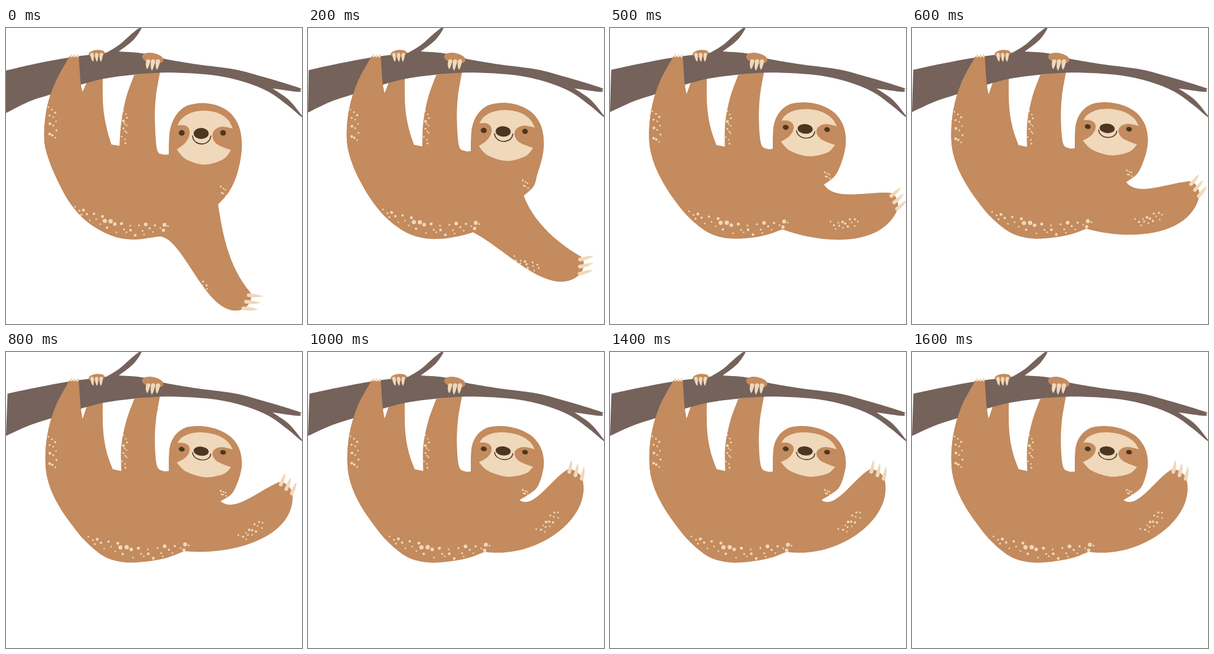
Recreate the animation shown at these times as an HTML page with a canvas. Size 480 by 480 pixels, loop 1.8 s.

```html
<!DOCTYPE html>
<html>
<head>
<meta charset="utf-8">
<style>
html, body { margin: 0; width: 100%; height: 100%; overflow: hidden; background: #fff; }
canvas { display: block; }
</style>
</head>
<body>
<canvas id="stage" width="480" height="480"></canvas>
<script>
const ctx = document.getElementById('stage').getContext('2d');
const FUR = '#c38b5e', BARK = '#74625b', CREAM = '#f0d8ba', DARK = '#4b3621';

// Key poses: time, torso swing, armpit, palm, slope of the knuckles in degrees
const poses = [
  { at: 0, swing: 0, armpit: [344, 286], palm: [390, 442], turn: 112 },
  { at: 200, swing: .45, armpit: [350, 272], palm: [441, 385], turn: 92 },
  { at: 300, swing: .5, armpit: [347, 265], palm: [448, 345], turn: 84 },
  { at: 500, swing: .76, armpit: [347, 254], palm: [460, 281], turn: 66 },
  { at: 800, swing: 1, armpit: [348, 242], palm: [453, 221], turn: 39 },
  { at: 1000, swing: .94, armpit: [343, 240], palm: [432, 199], turn: 29 }
];

const mix = (a, b, t) => Array.isArray(a) ? a.map((v, i) => mix(v, b[i], t)) : a + (b - a) * t;
const rad = deg => deg * Math.PI / 180;
const polar = ([x, y], r, deg) => [x + r * Math.cos(rad(deg)), y + r * Math.sin(rad(deg))];

// The arm rises in steps of 100 ms, then waves in steps of 200 ms
function poseAt(ms) {
  const step = ms < 800 ? 100 : 200, snap = Math.floor(ms / step) * step;
  const t = snap === 1200 ? 820 : Math.min(snap, 1000);
  const i = Math.max(1, poses.findIndex(p => p.at >= t));
  const a = poses[i - 1], b = poses[i], p = {};
  for (const k in a) p[k] = mix(a[k], b[k], (t - a.at) / (b.at - a.at));
  p.nod = (286 - p.armpit[1]) / 44;
  return p;
}

// Appends a smooth curve through flat x, y points
function curve(path, pts) {
  const n = pts.length / 2;
  const pt = i => { const k = 2 * Math.max(0, Math.min(n - 1, i)); return [pts[k], pts[k + 1]]; };
  path.lineTo(pts[0], pts[1]);
  for (let i = 0; i < n - 1; i++) {
    const [a, b, c, d] = [pt(i - 1), pt(i), pt(i + 1), pt(i + 2)];
    path.bezierCurveTo(b[0] + (c[0] - a[0]) / 6, b[1] + (c[1] - a[1]) / 6,
      c[0] - (d[0] - b[0]) / 6, c[1] - (d[1] - b[1]) / 6, c[0], c[1]);
  }
}

function shape(...parts) {
  const path = new Path2D();
  parts.forEach(p => curve(path, p));
  path.closePath();
  return path;
}

function fill(path, color) {
  ctx.fillStyle = color;
  ctx.fill(path);
}

function oval(x, y, rx, ry, color, tilt = 0) {
  const path = new Path2D();
  path.ellipse(x, y, rx, ry, tilt, 0, 7);
  fill(path, color);
}

// Scatters dots: place(u, v) gets 0..1 along the patch and -1..1 across it
function freckles(count, seed, big, place) {
  const random = () => (seed = seed * 16807 % 2147483647) / 2147483647;
  for (let i = 0; i < count; i++) {
    const across = (i % 3 - 1) * .7 + (random() - .5) * .5;
    const [x, y] = place((i + random()) / count, across);
    const r = 1.3 + big * random() ** 3;
    oval(x, y, r, r, CREAM);
  }
}

function claw([x, y], deg, len, w) {
  const path = new Path2D();
  path.arc(0, 0, w, Math.PI / 2, -Math.PI / 2);
  path.quadraticCurveTo(len * .7, -w * .7, len, 0);
  path.quadraticCurveTo(len * .7, w * 1.2, 0, w);
  ctx.save();
  ctx.translate(x, y);
  ctx.rotate(rad(deg));
  fill(path, CREAM);
  ctx.restore();
}

// Nodding squashes the head and drops its right side
const headY = (nod, x, y) => 134 - 5 * nod + (y - 134) * (1 - .173 * nod) + .075 * nod * (x - 300);

function armPath(path, { armpit, palm, turn, swing }) {
  const top = polar(palm, -15, turn), low = polar(palm, 15, turn);
  const belly = [250 + 39 * swing, 338 - 15 * swing];
  const reach = Math.hypot(top[0] - armpit[0], top[1] - armpit[1]);
  const span = Math.hypot(low[0] - belly[0], low[1] - belly[1]);
  const bend = (from, to) => path.bezierCurveTo(...from, ...to);
  path.moveTo(...armpit);
  path.bezierCurveTo(...polar(armpit, reach * .3, 20 + turn * .55), ...polar(top, -reach * .36, turn - 62), ...top);
  path.bezierCurveTo(...polar(top, 10, turn - 62), ...polar(low, -10, turn + 47), ...low);
  path.bezierCurveTo(...polar(low, span * .34, turn + 47),
    ...polar(belly, 40 + 45 * swing, 5 + 22 * Math.sin(Math.PI * swing)), ...belly);
  return belly;
}

function bodyPath(p) {
  const { swing: s, nod, armpit: [ax, ay] } = p, path = new Path2D();
  const head = (...pts) => pts.map((v, i) => i % 2 ? headY(nod, pts[i - 1], v) : v);
  const belly = armPath(path, p);
  const neck = 205 - 12 * s;
  [
    [...belly, 235 + 25 * s, 340 - 6 * s, 212 + 14 * s, 343 - 3 * s, 186 + 6 * s, 341, 160, 332, 130, 313 - 5 * s,
      104 + 2 * s, 284 - 5 * s, 85, 250 - 2 * s, 70, 215, 62 + 2 * s, 180, 66 + s, 131 + 4 * s, 80, 88 + s, 103, 46],
    [118, 46, 121, 88, 124, 104 + 5 * s],
    [131, 88, 134, 70],
    [157, 70, 157.5, 125, 163, 161, 171 + 2 * s, 189 + s],
    [184 + 3 * s, 191 + 2 * s, 187, 152, 195, 112, 208, 76],
    [250, 70, 243, 112, 241.5, 150, 245, neck - 8, 255, neck, 264, neck],
    [...head(264, 192, 266, 165, 274, 144, 288, 129, 305, 123, 325, 122, 346, 127, 365, 139, 378, 160),
      382.5, 187 - 9 * nod, 380, 215 - 17 * nod, 372, 245 - 25 * nod, ax + 16, ay - 18 + 8 * nod, ax, ay]
  ].forEach(part => curve(path, part));
  return path;
}

function branch(s) {
  fill(shape(
    [2.5 * s, 69 - 1.5 * s, 50, 57.5, 105, 47.5, 163, 40],
    [163, 40, 184, 27, 202, 11, 216, 0, 219, 2, 206, 20, 183, 38],
    [183, 38, 220, 41, 257, 50, 310, 59, 370, 67, 420, 80, 474, 96.5, 477, 100, 474, 103.5, 432, 98],
    [432, 98, 458, 116, 479, 141, 479, 144, 455, 124, 425, 103, 385, 87, 340, 77, 290, 73, 250, 72.5, 205, 76,
      160, 82, 121, 92, 75, 107, 38, 119, 0, 138 - 2 * s]), BARK);
}

function hands() {
  oval(147, 41.5, 13, 6, FUR, -.1);
  oval(238, 49, 17.5, 8.5, FUR, .2);
  for (let i = 0; i < 3; i++) {
    claw([106 + i * 5, 46], -95, 4, 1.8);
    claw([139.5 + i * 7.5, 43], 80 + i * 6, 12, 2.7);
    claw([230.5 + i * 8, 54], 97, [13, 15.5, 14][i], 3.3);
  }
}

function face(nod) {
  const scale = 1 - .173 * nod, skew = .075 * nod;
  ctx.save();
  ctx.transform(1, skew, 0, scale, 0, headY(nod, 0, 0));
  fill(shape(
    [278, 158, 285, 147, 300, 137.5, 321, 134, 344, 138, 360, 149, 368, 163],
    [368, 163, 350, 160, 338, 166, 335, 177, 343, 189, 365, 198],
    [365, 198, 352, 213, 322, 221.5, 292, 213, 277, 197],
    [277, 197, 290, 187, 297, 175, 297, 164, 290, 158, 278, 158]), CREAM);
  oval(285, 170, 4.8, 4.6, DARK);
  oval(352, 170, 4.6, 4.5, DARK);
  oval(316.5, 171, 12.2, 9, DARK);
  const smile = new Path2D('M302.5 175C304 193 331 192 332 175');
  ctx.strokeStyle = DARK;
  ctx.lineWidth = 1.6;
  ctx.lineCap = 'round';
  ctx.stroke(smile);
  ctx.restore();
}

function coat({ swing: s, nod, palm, turn }) {
  freckles(12, 7, 1.2, (u, v) => [75.5 + 7 * v, 124 + 58 * u + 9 * s]);
  freckles(12, 23, 1.2, (u, v) => [194.5 + 4.5 * v - 3 * u, 134 + 53 * u + s]);
  freckles(6, 5, .6, (u, v) => [353 + 5 * v, 255 - 31 * nod + 19 * u * (1 - .45 * nod)]);
  freckles(32, 11, 3, (u, v) => {
    const y = 293 + 34 * Math.sin(2.2 * u) + v * (4 + 7 * Math.sin(Math.PI * u));
    return [110 + 155 * u + s * (21 + 13 * u), y + s * (10 - 18 * u)];
  });
  const mid = polar(palm, 88, turn + 89);
  freckles(14, 31, 1, (u, v) => polar(polar(mid, 45 * u - 22, turn - 75), 8 * v, turn + 15));
}

function draw(p) {
  const body = bodyPath(p);
  ctx.clearRect(0, 0, 480, 480);
  fill(body, FUR);
  branch(p.swing);
  // the near leg hangs in front of the branch
  ctx.save();
  ctx.beginPath();
  ctx.rect(0, 0, 125, 480);
  ctx.clip();
  fill(body, FUR);
  ctx.restore();
  hands();
  face(p.nod);
  ctx.save();
  ctx.clip(body);
  coat(p);
  ctx.restore();
  for (let i = -1; i < 2; i++) claw(polar(p.palm, 2 + 11.5 * i, p.turn), p.turn - 108, 24 - 4 * p.nod, 3);
}

function tick(now) {
  draw(poseAt(now % 1800));
  requestAnimationFrame(tick);
}
requestAnimationFrame(tick);
</script>
</body>
</html>
```
